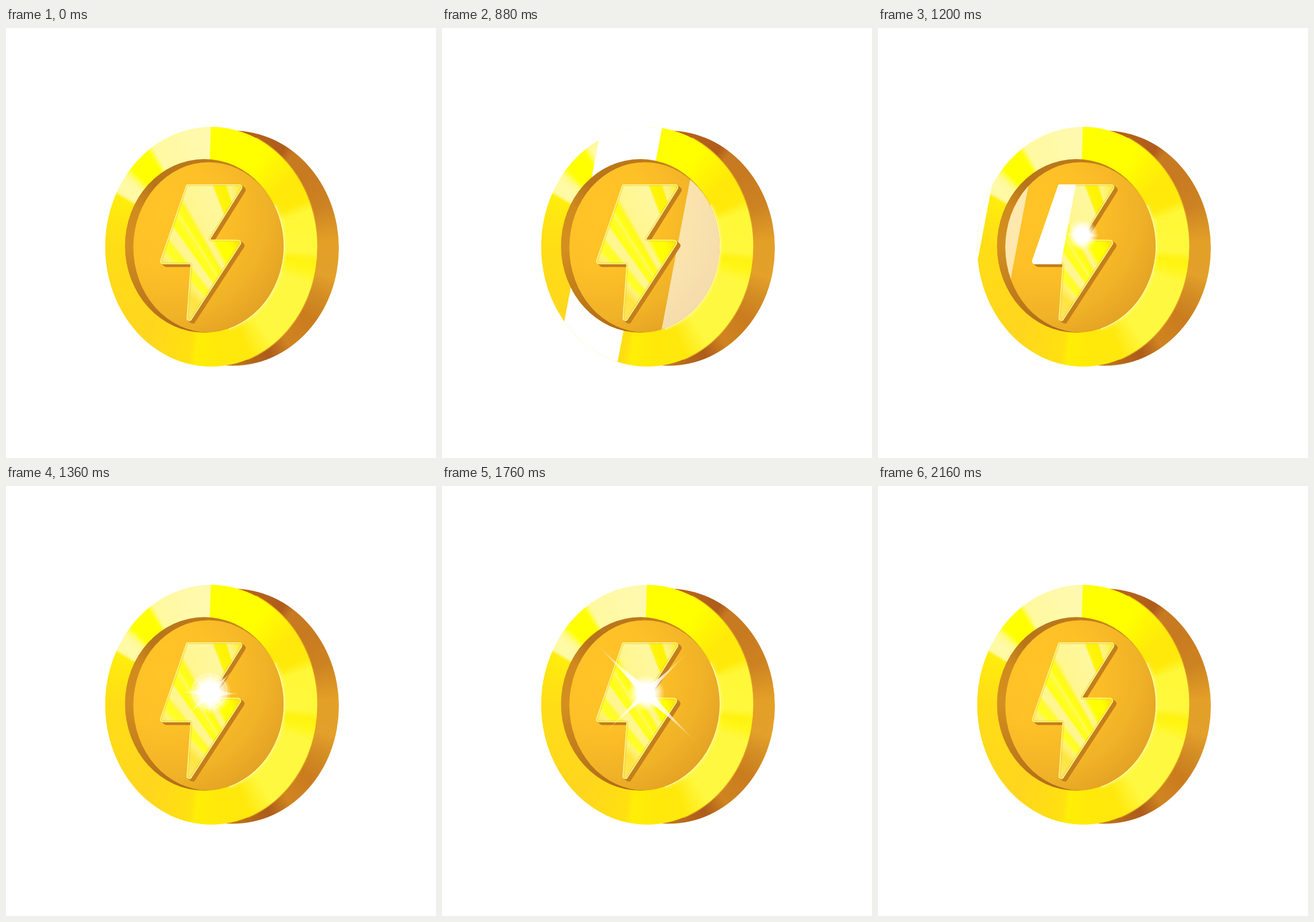
Animation, 748 px wide and 748 px high, one loop 3.12 s. Source, as an HTML page with a canvas:

```html
<!DOCTYPE html>
<html lang="en">
<head>
<meta charset="utf-8">
<title>Shining coin</title>
<style>
  html, body { margin: 0; width: 100%; height: 100%; overflow: hidden; background: #fff; }
  canvas { display: block; }
</style>
</head>
<body>
<canvas id="stage" width="748" height="748"></canvas>
<script>
const ctx = document.getElementById('stage').getContext('2d');
const LOOP = 3120, STEP = 80, RAD = Math.PI / 180;

function ellipse(x, y, rx, ry, from = 0, to = 360) {
  const p = new Path2D();
  p.ellipse(x, y, rx, ry, 0, from * RAD, to * RAD);
  return p;
}

// Corners are [x, y, radius].
function roundedPath(corners) {
  const p = new Path2D(), n = corners.length;
  const [a, b] = [corners[0], corners[n - 1]];
  p.moveTo((a[0] + b[0]) / 2, (a[1] + b[1]) / 2);
  corners.forEach(([x, y, r], i) => {
    const next = corners[(i + 1) % n];
    p.arcTo(x, y, next[0], next[1], r);
  });
  p.closePath();
  return p;
}

// Stops are [degrees from -180 to 180, colour].
function conic(x, y, stops) {
  const g = ctx.createConicGradient(Math.PI, x, y);
  for (const [deg, color] of stops) g.addColorStop((deg + 180) / 360, color);
  return g;
}

function radial(x, y, r, stops) {
  const g = ctx.createRadialGradient(x, y, 0, x, y, r);
  for (const [at, color] of stops) g.addColorStop(at, color);
  return g;
}

const face = ellipse(357, 380.5, 184.5, 208.5);
const back = ellipse(394.5, 383, 184.5, 204.5);
const hole = ellipse(345, 379, 138, 151);
const floor = ellipse(352.5, 381.5, 131, 148);
const rim = new Path2D(face);
rim.addPath(hole);
const bolt = roundedPath([
  [314, 272, 3], [415, 272, 5], [355, 368, 1], [413, 369, 5],
  [321, 510, 3], [314, 508, 3], [321, 411, 1], [266, 411, 5]
]);

const sidePaint = conic(375, 382, [
  [-180, '#b5651d'], [-78, '#b5641c'], [-58, '#b05c1c'], [-53, '#c67a22'], [-40, '#c87a20'],
  [-22, '#cd8322'], [-3, '#e3a027'], [15, '#e3a02a'], [25, '#d48f24'], [39, '#ca7c1e'],
  [55, '#d08420'], [66, '#ad5c1a'], [75, '#b4661b'], [90, '#c98522'], [180, '#b5651d']
]);
const rimPaint = conic(350, 380, [
  [-180, '#ffdd16'], [-165, '#ffe412'], [-150.5, '#ffee0c'], [-148.5, '#fff9a0'],
  [-143, '#fffaa8'], [-138.5, '#fffa90'], [-134, '#ffff00'], [-122, '#ffff00'],
  [-118.5, '#fff9a0'], [-88.6, '#fff9b0'], [-88, '#ffff00'], [-60, '#ffff00'],
  [-38, '#ffe80a'], [-25, '#ffea0c'], [-19, '#fff838'], [3, '#fff83c'], [8, '#fff210'],
  [13, '#fff618'], [20, '#fff840'], [56, '#fff840'], [69, '#ffe80c'], [82, '#ffe80a'],
  [96, '#ffee06'], [99, '#ffe010'], [125, '#ffd61e'], [180, '#ffdd16']
]);
const wallPaint = conic(345, 379, [
  [-180, '#d4901f'], [-150, '#d08a1e'], [-130, '#b8741a'], [-90, '#bd791b'], [-60, '#c98a1c'],
  [-30, '#f0c020'], [60, '#f0c020'], [100, '#b06a18'], [135, '#bd791b'], [180, '#d4901f']
]);
const floorPaint = radial(275, 325, 240, [
  [0, '#ffc428'], [0.4, '#fec027'], [0.75, '#f0b227'], [1, '#e2a024']
]);

// Light beams on the bolt meet at a point below it.
const boltPaint = conic(500, 640, [
  [-145, '#ffe36a'], [-136, '#ffe440'], [-132.5, '#fff27a'], [-131, '#ffff20'],
  [-129, '#fffa30'], [-128, '#fff690'], [-125.7, '#fff690'], [-125, '#ffff10'],
  [-123, '#fffb30'], [-122.4, '#fffa60'], [-121.6, '#ffff10'], [-120.2, '#fff820'],
  [-119, '#fff690'], [-111.2, '#fff79e'], [-110.7, '#fff410'], [-108, '#fff200'],
  [-107.4, '#fff58a'], [-105.5, '#fff060'], [-104, '#ffee20']
]);
const tipPaint = conic(500, 640, [
  [-118.3, 'rgba(255,255,0,0)'], [-116.5, '#ffff00'], [-113, '#ffff00'], [-110, '#ffe800']
]);

function clipped(path, draw, rule = 'nonzero') {
  ctx.save();
  ctx.clip(path, rule);
  draw();
  ctx.restore();
}

function fill(path, paint) {
  ctx.fillStyle = paint;
  ctx.fill(path);
}

function stroke(path, color, width) {
  ctx.strokeStyle = color;
  ctx.lineWidth = width;
  ctx.stroke(path);
}

// The slanted band sweeps left and slows down.
function shine(path, age, width, alpha, rule) {
  const x = 30 + 459 * Math.exp(-age / 203), lean = 0.19 * 374;
  if (age < -STEP || age > 520) return;
  clipped(path, () => {
    ctx.fillStyle = `rgba(255,255,255,${alpha})`;
    ctx.beginPath();
    ctx.moveTo(x + lean, 0);
    ctx.lineTo(x + width + lean, 0);
    ctx.lineTo(x + width - lean, 748);
    ctx.lineTo(x - lean, 748);
    ctx.fill();
  }, rule);
}

function drawCoin(t) {
  fill(back, sidePaint);
  stroke(ellipse(357, 380.5, 184.5, 208.5, -65, 70), '#e2a21e', 3);
  fill(face, rimPaint);
  shine(rim, t - 720, 106, 1, 'evenodd');

  // Lit edge of the well
  ctx.save();
  ctx.shadowColor = '#fffbb0';
  ctx.shadowBlur = 6;
  stroke(ellipse(345, 379, 138, 151, -28, 72), '#fffbb0', 3);
  ctx.restore();

  fill(hole, wallPaint);
  clipped(hole, () => {
    fill(floor, floorPaint);
    shine(floor, t - 842, 134, 0.62);
  });
}

function drawBolt(t) {
  for (let i = 6; i > 0; i -= 0.5) {
    ctx.save();
    ctx.translate(i, i * 0.8);
    fill(bolt, '#c47f1d');
    ctx.restore();
  }
  fill(bolt, boltPaint);
  clipped(bolt, () => {
    ctx.fillStyle = tipPaint;
    ctx.fillRect(340, 366, 90, 150);
    stroke(bolt, 'rgba(222,190,0,.4)', 6);
    stroke(bolt, '#fff59a', 3);
  });
  shine(bolt, t - 1024, 102, 1);
}

// Linear interpolation between [time, value] pairs.
function key(t, ...pairs) {
  if (t <= pairs[0][0]) return pairs[0][1];
  for (let i = 1; i < pairs.length; i++) {
    const [t0, a] = pairs[i - 1], [t1, b] = pairs[i];
    if (t < t1) return a + (b - a) * (t - t0) / (t1 - t0);
  }
  return pairs[pairs.length - 1][1];
}

function ray(deg, length, width) {
  if (length < 1) return;
  ctx.save();
  ctx.rotate(deg * RAD);
  ctx.fillStyle = radial(0, 0, length, [
    [0, '#fff'], [0.4, 'rgba(255,255,255,.8)'], [1, 'rgba(255,255,255,.15)']
  ]);
  ctx.beginPath();
  ctx.moveTo(-length, 0);
  ctx.quadraticCurveTo(-length * 0.2, -width * 0.2, 0, -width);
  ctx.quadraticCurveTo(length * 0.2, -width * 0.2, length, 0);
  ctx.quadraticCurveTo(length * 0.2, width * 0.2, 0, width);
  ctx.quadraticCurveTo(-length * 0.2, width * 0.2, -length, 0);
  ctx.fill();
  ctx.restore();
}

function drawFlare(t) {
  if (t <= 1120 || t >= 2160) return;
  const core = key(t, [1120, 0], [1200, 28], [1520, 47], [1760, 33], [2160, 0]);
  const cross = key(t, [1120, 0], [1200, 30], [1520, 70], [1760, 0]);
  const rising = key(t, [1200, 0], [1520, 111], [1760, 97], [2160, 0]);
  const falling = key(t, [1200, 0], [1520, 78], [1760, 120], [1840, 122], [2160, 0]);
  const ring = key(t, [1200, 0], [1520, 0.75], [1760, 0]);
  ctx.save();
  ctx.translate(355, 360);
  fill(ellipse(0, 0, core, core), radial(0, 0, core, [
    [0, '#fff'], [0.45, '#fff'], [0.7, 'rgba(255,255,240,.6)'], [1, 'rgba(255,250,190,0)']
  ]));
  if (ring > 0) {
    const r = key(t, [1200, 18], [1520, 42], [1760, 56]);
    stroke(ellipse(-1, -3, r, r), `rgba(255,255,235,${ring})`, 2);
  }
  ray(2, cross, 14);
  ray(92, cross * 0.75, 14);
  ray(-44, rising, 8);
  ray(44.5, falling, 11);
  ctx.restore();
}

const start = performance.now();

function frame() {
  const t = Math.floor((performance.now() - start) % LOOP / STEP) * STEP;
  ctx.fillStyle = '#fff';
  ctx.fillRect(0, 0, 748, 748);
  drawCoin(t);
  drawBolt(t);
  drawFlare(t);
  requestAnimationFrame(frame);
}
frame();
</script>
</body>
</html>
```
